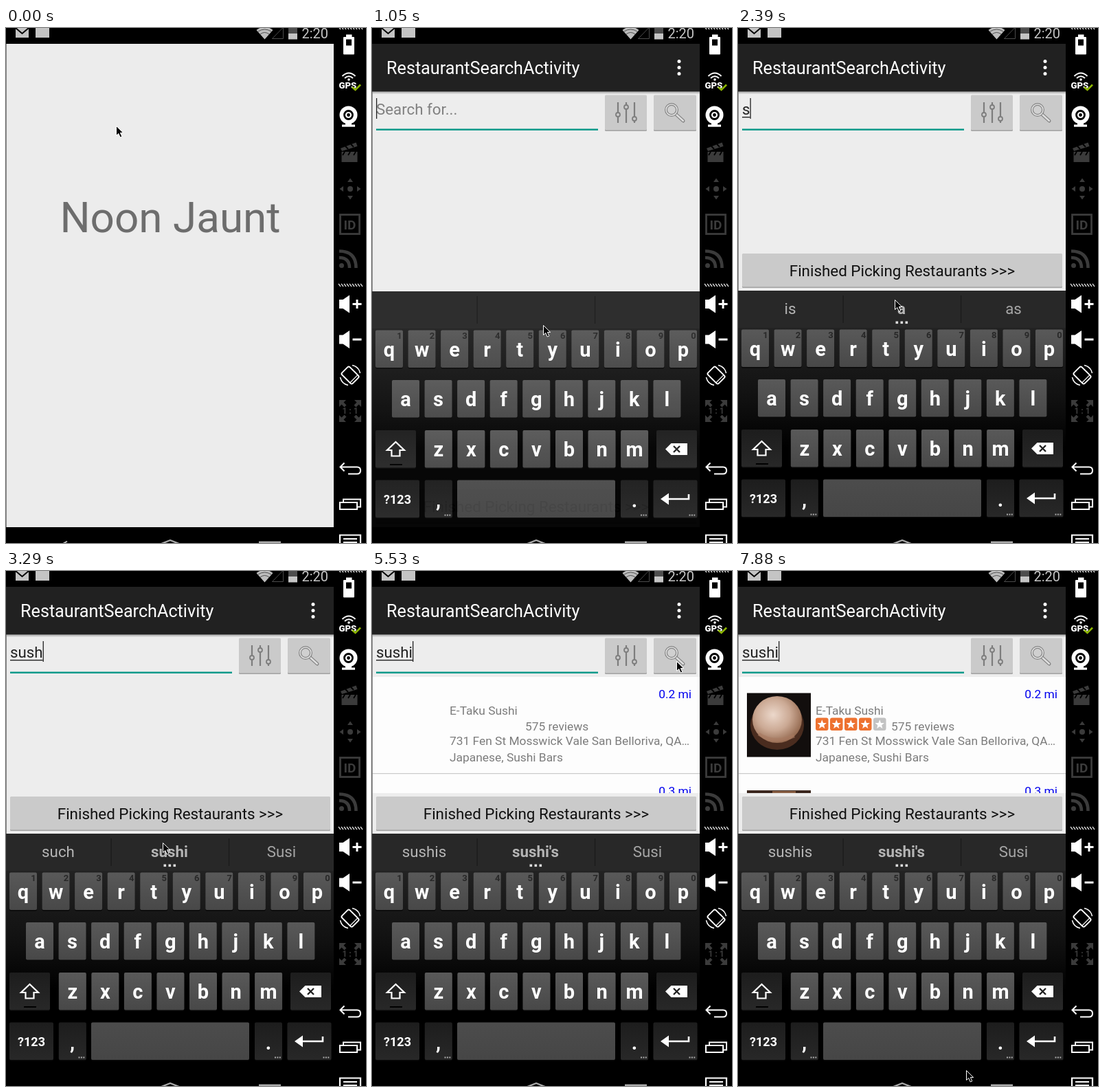
Recreate the animation shown at these times as an HTML page. Size 524 by 749 pixels, loop 8000 ms.

```html
<!DOCTYPE html>
<html lang="en">
<head>
<meta charset="utf-8">
<title>Restaurant search</title>
<style>
html, body { margin: 0; width: 100%; height: 100%; overflow: hidden; background: #000; }
svg { display: block; width: 524px; height: 749px; font-family: Roboto, "Noto Sans", sans-serif; }
text { white-space: pre; }
</style>
</head>
<body>
<svg id="stage" viewBox="0 0 524 749"></svg>
<script>
const LOOP = 8000;
const stage = document.getElementById('stage');
const $ = id => document.getElementById(id);

const rect = (x, y, w, h, fill, more = '') =>
  `<rect x="${x}" y="${y}" width="${w}" height="${h}" fill="${fill}" ${more}/>`;
const text = (x, y, size, fill, str, more = '') =>
  `<text x="${x}" y="${y}" font-size="${size}" fill="${fill}" ${more}>${str}</text>`;
const path = (d, fill, more = '') => `<path d="${d}" fill="${fill}" ${more}/>`;
const line = (d, color, width, more = '') =>
  path(d, 'none', `stroke="${color}" stroke-width="${width}" ${more}`);
const circle = (x, y, r, fill, more = '') =>
  `<circle cx="${x}" cy="${y}" r="${r}" fill="${fill}" ${more}/>`;
const ellipse = (x, y, rx, ry, fill, more = '') =>
  `<ellipse cx="${x}" cy="${y}" rx="${rx}" ry="${ry}" fill="${fill}" ${more}/>`;
const group = (id, body, more = '') => `<g id="${id}" ${more}>${body}</g>`;
const at = (x, y, body) => `<g transform="translate(${x} ${y})">${body}</g>`;
const gradient = (id, ...stops) =>
  `<linearGradient id="${id}" x1="0" y1="0" x2="0" y2="1">${stops.map(([o, c, a = 1]) =>
    `<stop offset="${o}" stop-color="${c}" stop-opacity="${a}"/>`).join('')}</linearGradient>`;
const repeat = (n, fn) => Array.from({ length: n }, (_, i) => fn(i)).join('');
const MID = 'text-anchor="middle"', BOLD = 'font-weight="700"';

const defs = `<defs>
  ${gradient('key', [0, '#595959'], [1, '#484848'])}
  ${gradient('space', [0, '#4c4c4c'], [1, '#464646'])}
  ${gradient('dim', [0, '#1d1d1d'], [1, '#282828'])}
  ${gradient('board', [0, '#222'], [.35, '#111'], [.6, '#000'])}
  ${gradient('shade', [0, '#000', .3], [1, '#000', 0])}
  <radialGradient id="dish" cx=".42" cy=".4" r=".62">
    <stop offset="0" stop-color="#ecd8cb"/><stop offset=".55" stop-color="#cba994"/>
    <stop offset="1" stop-color="#94694f"/>
  </radialGradient>
  <clipPath id="listArea"><rect x="1" y="154" width="476" height="169"/></clipPath>
  <clipPath id="photoArea"><rect x="13" y="177.500" width="93" height="93"/></clipPath>
</defs>`;

const statusBar = () => rect(0, 0, 477, 23, '#000') +
  rect(14, -3, 19, 17, '#c4c4c4') + line('M14 0L23.5 8 33 0', '#000', 2) +
  rect(43, -3, 20, 17, '#c4c4c4') +
  path('M364.500 3Q376.500 -6 388.500 3L376.500 16.500Z', '#bdbdbd') +
  line('M367 5Q376.500 -1 386 5M370 9Q376.500 4 383 9', '#333', .8) +
  line('M387.500 15.500H403.500V-1Z', '#4b4b4b', 1) +
  rect(411, -2, 13, 10, '#4d4d4d') + rect(411, 8, 13, 8.5, '#c4c4c4') +
  text(430.5, 15, 20, '#c6c6c6', '2:20');

const navBar = () => rect(0, 726, 477, 23, '#000') +
  line('M226 750L239 745L252 750', '#aaa', 2.4) + rect(368, 746.5, 32, 3, '#aaa') +
  group('back', line('M83 750L89 746.500', '#bbb', 2));

const splash = () => rect(0, 23, 1, 703, '#808080') + rect(1, 23, 476, 703, '#ececec') +
  text(239, 297, 62, '#6d6d6d', 'Noon Jaunt', MID) +
  rect(1, 23, 476, 703, '#000', 'id="splashDim"');

const plate = (x, y, w, h, id = '') =>
  rect(x, y + 1, w, h, '#a2a2a2', 'rx="1.5"') + rect(x, y, w, h - .5, '#cacaca', `rx="1.5" ${id}`);

function searchBar() {
  const slider = (x, y) => line(`M${x} 108V${y - 3.5}M${x} ${y + 3.5}V138`, '#7d7d7d', 2.2) +
    circle(x, y, 3, 'none', 'stroke="#7d7d7d" stroke-width="1.8"');
  return text(6, 126, 22.3, '#808080', 'Search for...', 'id="hint"') +
    text(6, 126, 22.3, '#222', '', 'id="query"') +
    rect(6, 129, 0, 1.4, '#222', 'id="underline"') +
    rect(6, 102, 1.3, 30, '#222', 'id="caret"') +
    rect(6, 146.5, 323, 2.5, '#0c9a8b') +
    plate(339, 97.5, 61, 51.5) + plate(410, 97.5, 62, 51.5, 'id="searchKey"') +
    slider(358, 126) + slider(370, 115) + slider(382, 132) +
    line('M442 125L453 135', '#828282', 5, 'stroke-linecap="round"') +
    line('M442 125L453 135', '#dedede', 2.4, 'stroke-linecap="round"') +
    circle(436, 119, 8, '#d0d0d0', 'stroke="#858585" stroke-width="4"') +
    circle(436, 119, 8, 'none', 'stroke="#e0e0e0" stroke-width="1.6"');
}

function results() {
  const row = (x, y, str) => text(x, y, 17.36, '#7c7c7c', str);
  const far = (y, str) => text(465, y, 17.36, '#00e', str, 'text-anchor="end"');
  const star = repeat(10, i => {
    const r = i % 2 ? 3 : 7, a = i * Math.PI / 5;
    return `${i ? 'L' : 'M'}${(r * Math.sin(a)).toFixed(1)} ${(-r * Math.cos(a)).toFixed(1)}`;
  });
  const stars = repeat(5, i => rect(113 + 21 * i, 213.5, 18.5, 18.5, i < 4 ? '#ee7230' : '#c3c3c3', 'rx="3"') +
    at(122.25 + 21 * i, 223.3, path(star + 'Z', '#fff')));
  const photo = `<g clip-path="url(#photoArea)">${rect(13, 177, 94, 94, '#120e0d')}
    ${ellipse(57, 224, 39, 36, '#4a2c1f')}
    ${ellipse(57, 216, 36, 34, 'url(#dish)')}
    ${line('M30 237Q52 252 82 240', '#a97a62', 5, 'opacity=".6"')}</g>`;
  return rect(1, 154, 476, 169, '#fdfdfd') + rect(1, 294, 476, 1.2, '#c9c9c9') +
    far(185, '0.2 mi') + far(326, '0.3 mi') +
    row(113, 209, 'E-Taku Sushi') + row(223, 232, '575 reviews') +
    row(113, 253, '731 Fen St Mosswick Vale San Belloriva, QA…') + row(113, 277, 'Japanese, Sushi Bars') +
    group('stars', stars) + group('photo', photo) +
    group('nextPhoto', rect(13, 319, 93, 5, '#3b271e') + rect(50, 320, 34, 4, '#8a6045'));
}

const activity = () => rect(1, 23, 476, 703, '#ededed') +
  rect(0, 23, 477, 69.5, '#212121') + rect(1, 92.5, 476, 4, 'url(#shade)') +
  text(21, 67, 25.2, '#fff', 'RestaurantSearchActivity') +
  [48.5, 57.5, 66.5].map(y => circle(447, y, 2.5, '#fff')).join('') + searchBar() +
  group('list', results(), 'clip-path="url(#listArea)"') +
  group('finish', plate(6, 328, 466, 49) +
    text(239, 361, 22.4, '#111', 'Finished Picking Restaurants &gt;&gt;&gt;', MID));

function keyboard() {
  const STEP = 47.55;
  const key = (x, y, w, fill = 'key') => rect(x, y + 1, w, 55, '#080808', 'rx="2"') +
    rect(x, y, w, 54.5, `url(#${fill})`, 'rx="2"');
  const letters = (str, x, y) => repeat(str.length, i => key(x + STEP * i, y, 40) +
    text(x + STEP * i + 20, y + 38, 29, '#fff', str[i], `${MID} ${BOLD}`));
  const digits = repeat(10, i =>
    text(40 + STEP * i, 451, 13, '#282828', (i + 1) % 10, `${MID} ${BOLD}`));
  const more = x => repeat(3, i => rect(x + 3.4 * i, 706.5, 2, 2, '#aaa'));
  const word = (id, x, fill, weight = '') => text(x, 416, 22.3, fill, '', `id="${id}" ${MID} ${weight}`);
  return rect(0, 382, 477, 54, '#282828') + rect(0, 436, 477, 290, 'url(#board)') +
    [152.5, 324].map(x => rect(x, 389, 1.2, 40, '#191919')).join('') +
    word('word0', 76, '#b5b5b5') + word('word1', 238, '#b5b5b5', BOLD) + word('word2', 401, '#a5a5a5') +
    group('dots', repeat(3, i => rect(229.5 + 7 * i, 426.5, 3.6, 3.6, '#ddd'))) +
    letters('qwertyuiop', 5, 438.5) + digits + letters('asdfghjkl', 29, 511) + letters('zxcvbnm', 76.8, 584) +
    key(5, 584, 59, 'dim') + key(414, 584, 59, 'dim') + key(5, 656.5, 64, 'dim') +
    key(76.8, 656.5, 40, 'dim') + key(124, 656.5, 230, 'space') +
    key(362, 656.5, 40, 'dim') + key(409.5, 656.5, 64, 'dim') +
    line('M34.500 601L47 613H40.500V621.500H28.500V613H22Z', '#fff', 2.2) + rect(26, 633, 18, 2, '#000') +
    path('M427 611.500L435.500 603H459V620H435.500Z', '#fff') +
    line('M439 607L448 616M448 607L439 616', '#222', 2.4) +
    text(37, 691, 18, '#fff', '?123', `${MID} ${BOLD}`) +
    text(96.5, 696, 29, '#fff', ',', `${MID} ${BOLD}`) + text(382, 696, 29, '#fff', '.', `${MID} ${BOLD}`) +
    more(105.5) + more(391) + more(461.5) +
    path('M420 684L432 675.500V692.500Z', '#fff') + line('M430 684H461V677', '#fff', 2.6);
}

function sidebar() {
  const GREY = '#3b3b3b';
  const hatch = y => repeat(9, i => line(`M${484 + 4 * i} ${y}l3 4`, '#ddd', 1.3));
  const speaker = y => path(`M485 ${y - 6.5}H490.500L500 ${y - 13}V${y + 13}L490.500 ${y + 6.5}H485Z`, '#fff');
  const corner = (sx, sy) => `<g transform="translate(501 557) scale(${sx} ${sy})">` +
    path('M16 16H6L9.500 12.500 5.500 8.500 8.500 5.500 12.500 9.500 16 6Z', GREY) + '</g>';
  const arrow = a => path('M0 -15.500L4 -10H-4Z', GREY, `transform="translate(501 234) rotate(${a})"`);
  const phone = rect(-8, -11, 16, 22, 'none', 'rx="2.5" stroke="#fff" stroke-width="2"') +
    line('M-8 7.500H8', '#fff', 1.2);
  return rect(477, 0, 47, 749, '#000') + hatch(-2) + hatch(372) +
    rect(495, 9.5, 8.5, 5, '#fff') + rect(491, 13, 16, 25.5, '#fff', 'rx="1"') + rect(495, 16.5, 8, 9, '#000') +
    line('M489.500 70Q499 61 508.500 70M493 73Q499 67.500 505 73', '#fff', 2) + circle(499, 75, 1.8, '#fff') +
    text(484.5, 87.5, 13.2, '#fff', 'GPS', 'font-weight="900"') + line('M504 86L508.500 90L516 82.500', '#8db600', 2.6) +
    circle(498.5, 126.5, 13, '#fff') + circle(498.5, 126.5, 6, 'none', 'stroke="#000" stroke-width="2.8"') +
    circle(498.5, 126.5, 2.4, '#000') + rect(494, 138, 9, 3, '#fff') + rect(489, 140.5, 19, 3.2, '#fff') +
    rect(488.5, 180, 23, 15, GREY) + path('M487 175L509.500 166.500L511.500 172L489 179Z', GREY) +
    line('M494 172L498 176M502 169L506 173M493 180L490 185M501 180L498 185M509 180L506 185', '#000', 1.8) +
    [0, 90, 180, 270].map(arrow).join('') + circle(501, 234, 4, GREY) +
    rect(486.5, 271.5, 28, 28, 'none', `stroke="${GREY}" stroke-width="2.8"`) +
    text(500.5, 292.5, 19, GREY, 'ID', `${MID} ${BOLD}`) +
    circle(488.5, 345.5, 3.5, GREY) + line('M485 334Q500 334 500 349M485 324.500Q509.500 324.500 509.500 349', GREY, 4.6) +
    speaker(401.5) + line('M504.500 401.500H517.500M511 395V408', '#fff', 3) +
    speaker(453) + line('M504.500 453H517.500', '#fff', 3) +
    `<g transform="translate(501 505) rotate(-45)">${phone}</g>` +
    line('M486.500 508A15 15 0 0 0 498 519.500M504 490.500A15 15 0 0 1 515.500 502', '#fff', 1.5) +
    corner(1, 1) + corner(-1, 1) + corner(1, -1) + corner(-1, -1) +
    text(501, 561, 12, GREY, '1 : 1', `${MID} ${BOLD}`) +
    line('M492.500 632.500L486.500 638.500L492.500 644.500M486.500 638.500H511Q516 638.500 516 643.500Q516 648.500 511 648.500H498', '#fff', 2) +
    line('M491 689V685.500H516V696.500H512', '#fff', 2) + rect(486, 690, 25, 10, 'none', 'stroke="#fff" stroke-width="2"') +
    line('M486 750V737.500H516V750M491 743H511M491 748H511', '#fff', 2.2);
}

const pointer = path('M.5 .5V14.500L3.800 11.500L6.200 17L8.800 15.900L6.400 10.500H10.700Z', '#000',
  'stroke="#fff" stroke-width="1"');

stage.innerHTML = defs + rect(0, 0, 524, 749, '#000') + splash() + group('activity', activity()) + statusBar() +
  group('keyboard', keyboard()) + navBar() + sidebar() + group('pointer', pointer);

// Held steps: [start, value...]
const POINTER = [
  [0, 160, 142], [150, 196, 285], [300, 225, 410], [1050, 249, 432], [1200, 246, 424], [1350, 238, 408],
  [1490, 228, 395], [3580, 255, 345], [3730, 335, 225], [3880, 412, 130], [4030, 432, 129], [4180, 443, 131],
  [5830, 440, 160], [5980, 425, 255], [6130, 395, 375], [6270, 360, 495], [6420, 328, 600], [6570, 305, 680],
  [6710, 292, 720], [6860, 288, 735], [7000, 294, 736], [7150, 302, 734], [7590, 315, 731], [7740, 327, 728], [7880, 332, 726]
];
const TYPING = [
  [0, ''], [2390, 's', 'is', 'a', 'as'], [2840, 'su', 'so', 'su', 'such'], [3140, 'sus', 'sis', 'sus', 'such'],
  [3290, 'sush', 'such', 'sushi', 'Susi'], [3430, 'sushi', 'sushis', "sushi's", 'Susi']
];
const CARET_OFF = [[1490, 1790], [2540, 2840], [4030, 4180], [6130, 6570], [7000, 7150], [7590, 7740]];

const held = (steps, t) => steps.filter(s => s[0] <= t).pop().slice(1);
const show = (id, on) => $(id).setAttribute('visibility', on ? 'inherit' : 'hidden');
const set = (id, attrs) => Object.entries(attrs).forEach(([k, v]) => $(id).setAttribute(k, v));

function draw(t) {
  const opening = t < 1050, rising = t < 1200;
  set('pointer', { transform: `translate(${held(POINTER, t).join(' ')})` });

  show('back', t < 900);
  show('activity', t >= 900);
  set('splashDim', { opacity: t < 900 ? 0 : .5 });
  set('activity', opening
    ? { opacity: .866, transform: 'translate(239 374) scale(.975) translate(-239 -374)' }
    : { opacity: 1, transform: '' });
  set('finish', { transform: `translate(0 ${rising ? 343 : 0})` });

  show('keyboard', !opening);
  set('keyboard', { opacity: rising ? .97 : 1, transform: `translate(0 ${rising ? 1 : 0})` });

  const [query, ...words] = held(TYPING, t);
  $('query').textContent = query;
  for (let i = 0; i < 3; i++) $('word' + i).textContent = words[i] || '';
  const width = query ? $('query').getComputedTextLength() : 0;
  set('underline', { width });
  set('caret', { x: 6 + width });
  show('hint', !query);
  show('dots', query);
  show('caret', !CARET_OFF.some(([a, b]) => t >= a && t < b));

  set('searchKey', { fill: t >= 4480 && t < 5530 ? '#b2b2b2' : '#cacaca' });
  show('list', t >= 5530);
  show('stars', t >= 5830);
  show('photo', t >= 5980);
  show('nextPhoto', t >= 6130);
}

const start = performance.now();
function tick() {
  draw((performance.now() - start) % LOOP);
  requestAnimationFrame(tick);
}
tick();
</script>
</body>
</html>
```
